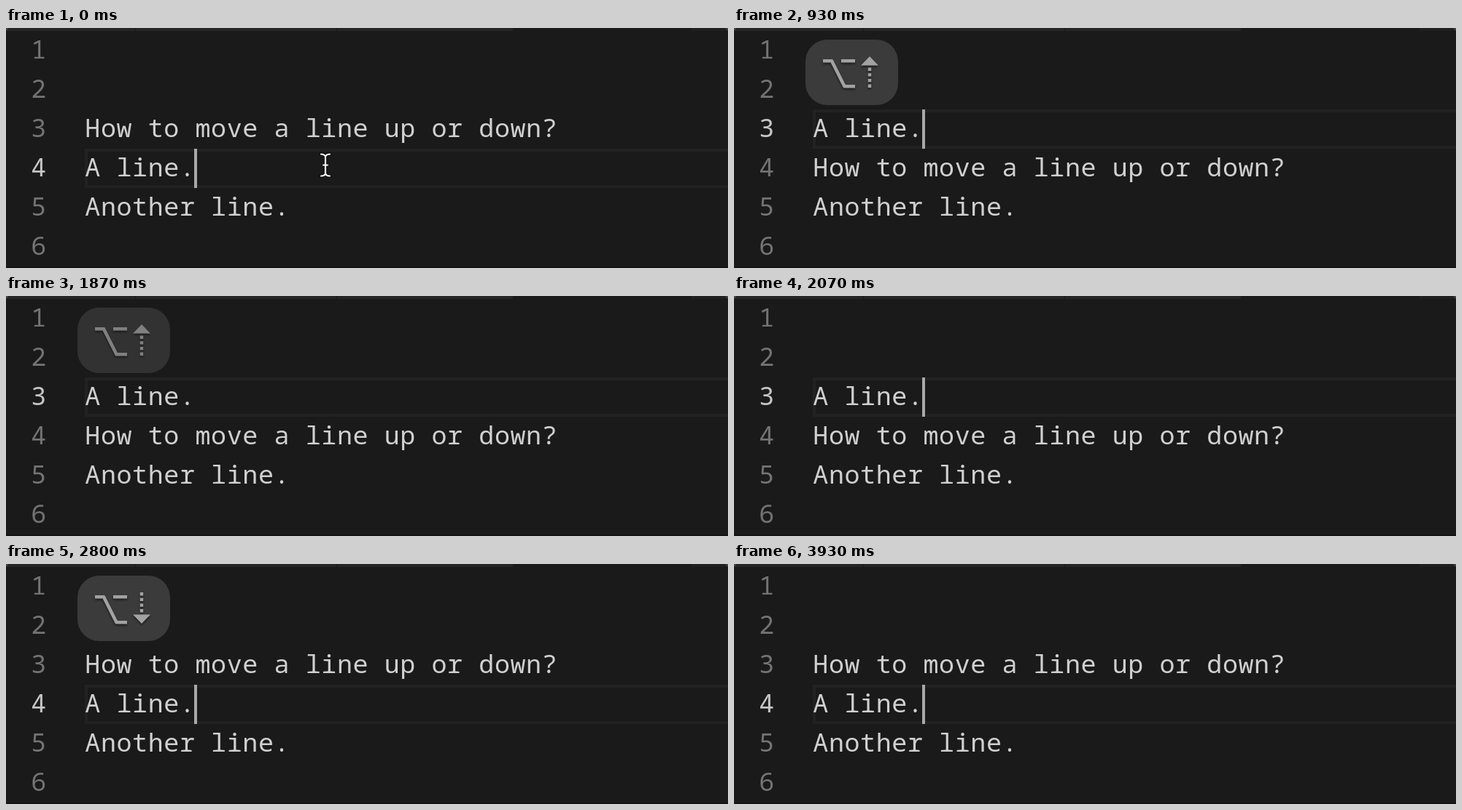
An HTML page for the animation above (4270 ms loop, 990 by 330 pixels).

```html
<!DOCTYPE html>
<html lang="en">
<head>
<meta charset="utf-8">
<title>Moving a line</title>
<style>
  html, body { margin: 0; width: 100%; height: 100%; overflow: hidden; background: #1a1a1a; }
  svg { display: block; width: 100vw; height: 100vh; }
  text { font: 400 35px "Noto Sans Mono", "DejaVu Sans Mono", monospace; letter-spacing: .6px; white-space: pre; }
  .code text { fill: #d0d0d0; }
  .icon { filter: drop-shadow(0 2px 1.5px rgba(0, 0, 0, .55)); }
</style>
</head>
<body>
<svg viewBox="0 0 990 330">
  <defs>
    <path id="beam" d="M432 173.5Q437 173.5 438 177Q439 173.5 444 173.5M438 177V200M432 203.5Q437 203.5 438 200Q439 203.5 444 203.5M435 188.5H441"/>
  </defs>
  <rect width="990" height="330" fill="#1a1a1a"/>
  <g fill="#252525">
    <rect width="177" height="4"/>
    <rect x="178" width="275" height="4"/>
    <rect x="454" width="241" height="4"/>
    <rect x="940" width="50" height="4" fill="#202020"/>
  </g>
  <path d="M0 3Q1 1 3 0M987 0Q989 1 990 3" fill="none" stroke="#555" stroke-width="1.2"/>
  <rect y="328" width="990" height="2" fill="#161416"/>

  <rect id="active" x="110" width="900" height="50" fill="none" stroke="#222" stroke-width="4"/>
  <g id="numbers"></g>
  <g class="code">
    <text id="question" x="108.3">How to move a line up or down?</text>
    <text id="moving" x="108.3">A line.</text>
    <text id="another" x="108.3">Another line.</text>
  </g>
  <rect id="caret" x="258" width="4" height="54" fill="#a9a9a9"/>

  <g id="mouse" fill="none" stroke-linecap="round" stroke-linejoin="round">
    <use href="#beam" stroke="#111" stroke-width="4.5"/>
    <use href="#beam" stroke="#fff" stroke-width="2.2"/>
  </g>

  <g id="badge">
    <rect x="98" y="16" width="127" height="90" rx="30" fill="#3b3b3b"/>
    <g class="icon">
      <path d="M122 45.3H134L151.5 80.3H166M147 45.3H166" fill="none" stroke="#a2a2a2" stroke-width="4.6" stroke-linejoin="round"/>
      <g id="arrow">
        <path d="M186 39L198 51.5H174Z" fill="#a2a2a2"/>
        <path d="M186 54.5V82" stroke="#a2a2a2" stroke-width="4.4" stroke-dasharray="4.4 3.3"/>
      </g>
    </g>
  </g>
</svg>
<script>
  const LOOP = 4270, ROW = 54, TOP = 4, BASE = 37.9;
  const UP = 930, DOWN = 2800;
  const $ = id => document.getElementById(id);
  const within = (t, a, b) => t >= a && t < b;
  const rowTop = row => TOP + (row - 1) * ROW;
  const put = (el, row) => el.setAttribute("y", rowTop(row) + BASE);
  const show = (el, on) => el.setAttribute("visibility", on ? "visible" : "hidden");

  const numbers = [1, 2, 3, 4, 5, 6].map(n => {
    const el = document.createElementNS("http://www.w3.org/2000/svg", "text");
    el.textContent = n;
    el.setAttribute("x", 34.3);
    put(el, n);
    return $("numbers").appendChild(el);
  });
  put($("another"), 5);

  const caretOff = [[200, 730], [1470, 2000], [2470, DOWN], [3270, 3800]];

  // The badge holds, then fades out in four steps.
  function badgeAlpha(t, start, fade) {
    if (t < start) return 0;
    const steps = [0, 60, 130, 200].filter(s => t >= fade + s).length;
    return 1 - steps / 4;
  }

  function draw(t) {
    const row = within(t, UP, DOWN) ? 3 : 4;
    const down = t >= DOWN;
    put($("moving"), row);
    put($("question"), 7 - row);
    $("active").setAttribute("y", rowTop(row) + 2);
    $("caret").setAttribute("y", rowTop(row));
    numbers.forEach((el, i) => el.setAttribute("fill", i + 1 === row ? "#c6c6c6" : "#737373"));
    show($("caret"), !caretOff.some(([a, b]) => within(t, a, b)));
    show($("mouse"), t < UP);
    $("badge").setAttribute("opacity", down ? badgeAlpha(t, DOWN, 3730) : badgeAlpha(t, UP, 1870));
    $("arrow").setAttribute("transform", down ? "matrix(1 0 0 -1 0 121)" : "");
  }

  const begin = performance.now();
  function tick() {
    draw((performance.now() - begin) % LOOP);
    requestAnimationFrame(tick);
  }
  tick();
</script>
</body>
</html>
```
